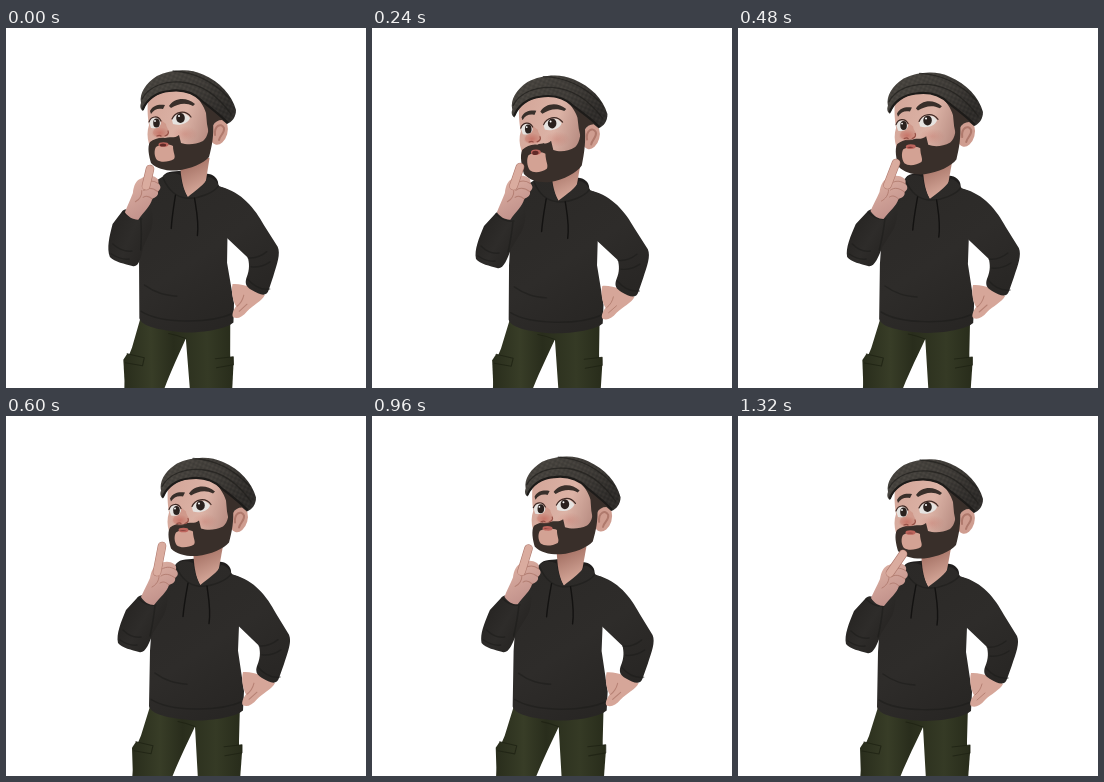
Recreate the animation shown at these times as an HTML page. Size 360 by 360 pixels, loop 1440 ms.

```html
<!DOCTYPE html>
<html lang="en">
<head>
<meta charset="utf-8">
<title>Thinking man</title>
<style>
  html, body { margin: 0; width: 100%; height: 100%; overflow: hidden; background: #fff; }
  svg { display: block; width: 100vw; height: 100vh; }
  .line { fill: none; stroke-linecap: round; stroke-linejoin: round; }
  .fold { stroke: #1b1a19; stroke-width: 1.5; opacity: .5; }
  .hair { fill: #392f2a; }
  .crease { stroke: #a87164; stroke-width: 1; opacity: .7; }
</style>
</head>
<body>
<svg viewBox="0 0 360 360">
  <defs>
    <linearGradient id="cloth" gradientUnits="userSpaceOnUse" x1="140" y1="160" x2="232" y2="300">
      <stop offset="0" stop-color="#2b2927"/><stop offset=".55" stop-color="#2e2c2a"/><stop offset="1" stop-color="#272523"/>
    </linearGradient>
    <linearGradient id="sleeve" gradientUnits="userSpaceOnUse" x1="108" y1="200" x2="150" y2="225">
      <stop offset="0" stop-color="#262422"/><stop offset=".5" stop-color="#2e2c2a"/><stop offset="1" stop-color="#252321"/>
    </linearGradient>
    <linearGradient id="pants" gradientUnits="userSpaceOnUse" x1="122" y1="0" x2="234" y2="0">
      <stop offset="0" stop-color="#292d1c"/><stop offset=".25" stop-color="#383d27"/><stop offset=".45" stop-color="#292d1c"/>
      <stop offset=".75" stop-color="#353a25"/><stop offset="1" stop-color="#272b1a"/>
    </linearGradient>
    <linearGradient id="skin" gradientUnits="userSpaceOnUse" x1="158" y1="90" x2="222" y2="112">
      <stop offset="0" stop-color="#d5a89b"/><stop offset=".5" stop-color="#dcb3a6"/><stop offset="1" stop-color="#b0847a"/>
    </linearGradient>
    <linearGradient id="neck" gradientUnits="userSpaceOnUse" x1="190" y1="140" x2="202" y2="166">
      <stop offset="0" stop-color="#a87568"/><stop offset="1" stop-color="#d6a89a"/>
    </linearGradient>
    <linearGradient id="palm" gradientUnits="userSpaceOnUse" x1="140" y1="150" x2="160" y2="185">
      <stop offset="0" stop-color="#dcafa2"/><stop offset="1" stop-color="#c0908a"/>
    </linearGradient>
    <linearGradient id="felt" gradientUnits="userSpaceOnUse" x1="175" y1="45" x2="225" y2="92">
      <stop offset="0" stop-color="#47443f"/><stop offset=".5" stop-color="#3f3c38"/><stop offset="1" stop-color="#2c2a28"/>
    </linearGradient>
    <radialGradient id="blush">
      <stop offset="0" stop-color="#c56d61" stop-opacity=".8"/><stop offset="1" stop-color="#c56d61" stop-opacity="0"/>
    </radialGradient>
    <pattern id="weave" width="4" height="4" patternUnits="userSpaceOnUse" patternTransform="rotate(24)">
      <path d="M0 1H4M1 0V4" stroke="#6a655b" stroke-width=".6" opacity=".25"/>
      <path d="M0 3H4M3 0V4" stroke="#181715" stroke-width=".7" opacity=".25"/>
    </pattern>
    <path id="cap" d="M150 76C148 66 155 56 166 49C180 42 199 41 212 47.500C229 55 241 68 245 83C245 90 241 95 236 97C228 88 218 80 209 72C196 62 178 62 166 68C158 72 154 78 152 84C149 82 149 79 150 76Z"/>
  </defs>

  <g id="body">
    <g fill="url(#pants)">
      <path d="M141 288L131 320L125 334L122 364H161C168 346 178 326 185 311L188 364H229V325L230 288Z"/>
      <path d="M126 326L122 332L123 364H138L143 330Z"/>
      <path d="M214 331L232 329V337L230 364H215Z"/>
    </g>
    <path class="line" stroke="#1e2213" stroke-width="1.1" opacity=".8" d="M126 326L143 330L141 338L124 335M214 331L232 329V337L215 340M185 311C180 309 174 307 168 306"/>
    <path fill="#201e1d" d="M166 150C170 144 180 146 188 144L212 148C218 149 222 154 221 160L205 176L183 172Z"/>
    <path fill="url(#neck)" d="M183 136L184 148C185 158 187 166 191 172C200 171 207 163 209 154L213 132Z"/>
    <path fill="url(#cloth)" d="M165 151C155 157 148 164 144 180L140 236L139 291C141 299 158 303 184 305C206 305 226 301 233 295L234 276L228 236L229 211L250 182C246 171 236 166 222 160C219 154 214 151 211 151C208 158 199 164 190 171C186 164 184 156 183 149C177 146 170 146 165 151Z"/>
    <path class="line fold" d="M166 152C171 164 179 171 189 172C202 173 217 166 221 160M141 284C160 296 208 297 233 286M145 258C156 266 165 268 177 269"/>
    <path class="line" stroke="#131211" stroke-width="1.400" d="M178 169C176 180 174 190 173 202M197 172C199 186 201 196 199 209"/>
    <path fill="#d6a699" d="M233 257C243 256 258 262 265 268C262 274 253 278 247 284C242 290 237 292 233 290C231 288 233 283 236 279C233 274 231 265 233 257Z"/>
    <path class="line crease" d="M237 279C241 276 243 272 244 268M239 284L247 277"/>
    <path fill="url(#cloth)" d="M224 161C244 166 257 182 266 199L279 220C282 227 278 237 274 249L269 263C267 270 260 268 252 263C247 260 245 257 247 251C251 242 250 236 249 231L228 211Z"/>
    <path class="line fold" d="M248 252C254 259 262 263 270 262M249 231C257 232 263 229 268 225M252 240C259 241 265 239 271 235"/>
  </g>

  <g id="head">
    <ellipse cx="228" cy="105" rx="8.500" ry="13" transform="rotate(16 228 105)" fill="#cf9d90"/>
    <path class="line" stroke="#a1695d" stroke-width="2" opacity=".7" d="M224 108C223 99 230 95 233 101C234 106 229 108 228 113"/>
    <path fill="url(#skin)" d="M157 72C156 84 157 92 158 98C156 104 156 110 158 117L161 128C168 138 180 138 190 136C206 133 216 125 219 112L222 80L190 58L168 62Z"/>
    <ellipse cx="194" cy="107" rx="13" ry="8" fill="url(#blush)" opacity=".4"/>
    <g id="jaw">
      <path class="hair" d="M217 90C219 100 217 109 212 113C204 117 196 117 190 115L188 107C183 111 179 108 174 110C169 109 163 111 159 114C156 119 158 128 160 135C166 141 175 143 186 142.500C200 141 213 135 218 129C221 118 223 108 222 94Z"/>
      <path fill="#d3a294" d="M165 119C170 116 178 116 182 118C182 125 185 128 183 131C178 134 170 135 166 132C163 128 163 122 165 119Z"/>
      <ellipse cx="172.500" cy="116.500" rx="5" ry="2.300" fill="#bd645c"/>
      <ellipse id="mouth" cx="172" cy="117" rx="3.200" fill="#612a27"/>
    </g>
    <path fill="#d0998b" d="M170 93C168 98 162 102 162 106C163 111 172 111 177 108C180 104 175 101 175 97Z"/>
    <ellipse cx="169" cy="106" rx="9" ry="6" fill="url(#blush)"/>
    <path class="line" stroke="#965046" stroke-width="1.200" d="M166 109C168 108 169 108 170 109M174 109C177 108 178 106 177 104"/>
    <g fill="#e6e3e0">
      <path d="M158 95C160 89 168 89 170 96C169 101 165 102 160 101Z"/>
      <path d="M181 93C183 86 194 83 199 91C197 97 188 99 182 97Z"/>
    </g>
    <g fill="#2a211e">
      <ellipse cx="165.500" cy="96" rx="3.300" ry="4.500"/><ellipse cx="189.500" cy="91" rx="4.300" ry="5"/>
    </g>
    <circle cx="164" cy="94" r=".9" fill="#fff"/><circle cx="188" cy="89" r="1" fill="#fff"/>
    <path class="line" stroke="#3f2a25" stroke-width="1.200" d="M158 95C160 89 167 88 170 94M181 92C184 85 194 82 200 90"/>
    <path class="hair" d="M159 84C162 78 168 77 174 78L172 82C167 81 163 82 160 87ZM178 79C183 71 195 69 204 77L202 79C194 75 187 77 180 81Z"/>
    <path class="hair" d="M202 66C208 72 213 79 215 86L216 97L219 112C219 101 223 93 231 93L236 97L239 84L220 68Z"/>
    <use href="#cap" fill="url(#felt)"/>
    <use href="#cap" fill="url(#weave)"/>
    <path class="line" stroke="#201e1c" stroke-width="1.300" opacity=".7" d="M151 72C158 59 174 54 190 55C211 57 226 68 240 87M182 44C204 45 224 56 239 72"/>
    <path class="line" stroke="#1d1b19" stroke-width="2.200" d="M152 82C156 72 166 65 178 64C192 62 203 66 211 74C220 81 228 87 236 95"/>
  </g>

  <g id="arm">
    <path fill="url(#sleeve)" d="M150 164C158 172 160 186 154 200L143 218C139 229 135 239 129 237C122 235 112 233 108 228C106 219 111 207 116 195L127 183C130 179 134 180 136 182L143 178Z"/>
    <path class="line fold" d="M128 183C133 188 138 191 146 190M145 190C144 202 142 212 140 221M113 215C119 221 125 223 131 222M110 225C116 229 121 231 127 230"/>
  </g>
  <g id="fist">
    <path fill="url(#palm)" d="M133 182C135 177 139 170 142 163C143 156 146 150 151 149C156 146 162 146 166 149C169 151 168 153 168 155C171 158 170 161 167 163C168 167 164 169 161 170C159 177 152 182 146 190C141 190 136 187 133 182Z"/>
    <path class="line crease" d="M154 154C159 151 164 152 168 155M153 161C157 158 162 159 167 163M152 168C155 166 158 167 161 170M144 172C148 170 151 166 151 161"/>
  </g>
  <path id="edge" class="line" stroke="#b07a6e" stroke-width="8.600"/>
  <path id="finger" class="line" stroke="#daac9f" stroke-width="7.400"/>
</svg>
<script>
const STEP = 120, COUNT = 12;

// body: top x, bottom x, top y | head: x, y, turn, jaw y, jaw stretch, mouth
// arm: cuff x, elbow x, y | fist: x, y, turn | finger: base, tip
const poses = [
  { at: 0, body: [-9, -4, -2], head: [-15, -1, 0, 1, 1, 1.6], arm: [-11, -3, 1], fist: [-14, 2, -3], finger: [140, 158, 144, 141] },
  { at: 1, body: [-7, -4, 2], head: [-13, 4, -2, 2, 1.18, 3], arm: [-8, -6, 3], fist: [-13, 1, -6], finger: [135, 158, 136, 138] },
  { at: 3, body: [-1, 1, 2], head: [-4.5, 4, -1, 1, 1.14, .6], arm: [0, -2, 3], fist: [-3, 3, 0], finger: [148, 158, 160, 140] },
  { at: 5, body: [4, 4, -2], head: [5, -1.5, 0, -1, 1, .3], arm: [4, 4, -1], fist: [2, -1, 0], finger: [151, 156, 156, 130] },
  { at: 7, body: [3, 3.5, -2], head: [5, -3, 1.5, -2, .98, .2], arm: [4, 3, -2], fist: [3, -1, 0], finger: [153, 156, 164, 135] },
  { at: 9, body: [0, 0, -1], head: [1, -2, .5, 0, 1, .2], arm: [0, 0, 0], fist: [-4, -2, -3], finger: [146, 155, 149, 130] },
  { at: 11, body: [0, 0, 0], head: [0, 0, 0, 0, 1, .2], arm: [0, 0, 0], fist: [0, 0, 0], finger: [152, 157, 165, 138] }
];

const el = id => document.getElementById(id);
const set = (id, name, value) => el(id).setAttribute(name, value);

// Slides the top and bottom of a part by different amounts.
function shear(y0, x0, dy0, y1, x1, dy1) {
  const h = y1 - y0, k = (x0 - x1) / h, m = (dy0 - dy1) / h;
  return `matrix(1 0 ${-k} ${1 - m} ${x1 + k * y1} ${dy1 + m * y1})`;
}

function poseAt(n) {
  const i = Math.max(1, poses.findIndex(p => p.at >= n));
  const a = poses[i - 1], b = poses[i], u = (n - a.at) / (b.at - a.at);
  return key => a[key].map((v, j) => v + (b[key][j] - v) * u);
}

function draw(n) {
  const pose = poseAt(n);
  const [top, low, rise] = pose('body');
  const [hx, hy, turn, jy, stretch, open] = pose('head');
  const [cuff, elbow, ay] = pose('arm');
  const [fx, fy, ft] = pose('fist');
  const [bx, by, tx, ty] = pose('finger');
  const line = `M${bx} ${by}L${tx} ${ty}`;
  set('body', 'transform', shear(150, top, rise, 360, low, 0));
  set('head', 'transform', `translate(${hx} ${hy}) rotate(${turn} 205 115)`);
  set('jaw', 'transform', `translate(0 ${jy + 108 * (1 - stretch)}) scale(1 ${stretch})`);
  set('mouth', 'ry', open);
  set('arm', 'transform', shear(185, cuff, ay, 235, elbow, ay));
  set('fist', 'transform', `translate(${fx} ${fy}) rotate(${ft} 140 184)`);
  set('edge', 'd', line);
  set('finger', 'd', line);
}

let last = -1;
function tick() {
  const n = Math.floor(performance.now() / STEP) % COUNT;
  if (n !== last) draw(last = n);
  requestAnimationFrame(tick);
}
tick();
</script>
</body>
</html>
```
